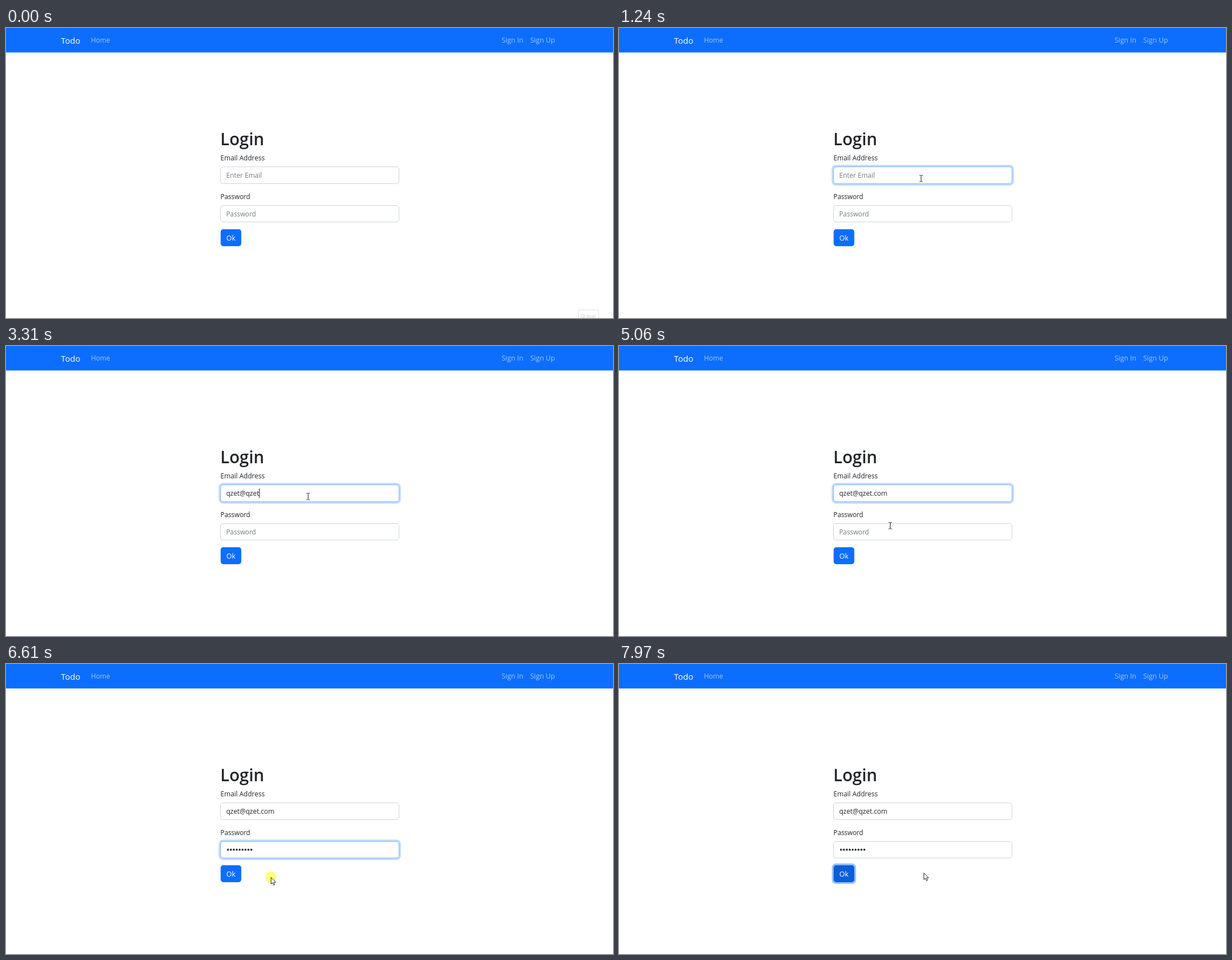
Animation, 1082 px wide and 517 px high, one loop 8 s. Source, as an HTML page:

```html
<!DOCTYPE html>
<html lang="en">
<head>
<meta charset="utf-8">
<title>Login form</title>
<style>
  html, body { margin: 0; width: 100%; height: 100%; overflow: hidden; background: #fff; }
  svg { display: block; width: 1082px; height: 517px; }
  text { font: 12px "Open Sans", "Noto Sans", sans-serif; fill: #212529; white-space: pre; }
  .nav { font-size: 12.4px; fill: #fff; fill-opacity: .6; }
  .brand { font-size: 15px; fill: #fff; }
  .title { font-size: 29.8px; font-weight: 600; }
  .hint { fill: #757b81; }
  .ok { font-size: 12.5px; fill: #fff; }
  .tip text { font-size: 9px; fill: #c9c9c9; }
  .tip rect { fill: #fff; stroke: #e2e2e2; }
  .field { fill: #fff; stroke: #ced4da; }
  .glow { fill: none; stroke: #c2dbfe; stroke-width: 3.2; }
  .edge { fill: none; stroke: #86b7fe; }
  .dots { stroke: #212529; stroke-width: 3.7; stroke-linecap: round; stroke-dasharray: 0 5.2; }
  .caret { fill: #212529; }
  .ink { fill: #fff; stroke: #111; stroke-width: .9; stroke-linejoin: round; }

  .run { animation: 8s linear infinite; }
  .tip { animation-name: tip; animation-timing-function: step-end; }
  .email-ring { animation-name: email-ring; animation-timing-function: ease-in-out; }
  .pass-ring { animation-name: pass-ring; animation-timing-function: ease-in-out; }
  .ok-ring { animation-name: ok-ring; animation-timing-function: ease-in-out; }
  .button { animation-name: button; }
  .pointer { animation-name: move; animation-timing-function: ease-in-out; }
  .click { fill: #ff0; fill-opacity: .5; animation-name: click; animation-timing-function: step-end; }
  .arrow { animation-name: arrow; animation-timing-function: step-end; }
  .beam { animation-name: beam; animation-timing-function: step-end; }
  .hand { animation-name: hand; animation-timing-function: step-end; }

  @keyframes tip { 0% { opacity: 1 } .375%, 100% { opacity: 0 } }
  @keyframes email-ring {
    0%, 8.6% { opacity: 0 } 10.5%, 64.5% { opacity: 1 } 66.4%, 100% { opacity: 0 }
  }
  @keyframes pass-ring {
    0%, 64.5% { opacity: 0 } 66.4%, 82.9% { opacity: 1 } 84.8%, 100% { opacity: 0 }
  }
  @keyframes ok-ring { 0%, 93.9% { opacity: 0 } 95.8%, 100% { opacity: 1 } }
  @keyframes button {
    0%, 86.6% { fill: #0d6efd } 88.1%, 93.9% { fill: #0b5ed7 }
    94.8% { fill: #0a58ca } 96.5%, 100% { fill: #0b5ed7 }
  }
  @keyframes move {
    0%, .375% { transform: translate(1041px, 503px); animation-timing-function: cubic-bezier(.25, .5, .4, 1) }
    6.6%, 60.25% { transform: translate(538px, 268px) }
    63.2%, 64.5% { transform: translate(483px, 320px) }
    65%, 78.5% { transform: translate(483px, 321px) }
    82.1%, 84% { transform: translate(472px, 380px) }
    87.5%, 95.5% { transform: translate(405px, 374px) }
    99.6%, 100% { transform: translate(543px, 372px) }
  }
  @keyframes click {
    0% { opacity: 0 }
    8.6% { opacity: 1 } 10.2% { opacity: 0 }
    64.5% { opacity: 1 } 66.2% { opacity: 0 }
    82.5% { opacity: 1 } 83.8% { opacity: 0 }
    93.9% { opacity: 1 } 95.4%, 100% { opacity: 0 }
  }
  @keyframes arrow {
    0% { opacity: 0 } .375% { opacity: 1 } 5% { opacity: 0 }
    61% { opacity: 1 } 62.6% { opacity: 0 }
    80% { opacity: 1 } 86.6% { opacity: 0 } 96.4%, 100% { opacity: 1 }
  }
  @keyframes beam {
    0% { opacity: 0 } 5% { opacity: 1 } 61% { opacity: 0 }
    62.6% { opacity: 1 } 80%, 100% { opacity: 0 }
  }
  @keyframes hand { 0% { opacity: 0 } 86.6% { opacity: 1 } 96.4%, 100% { opacity: 0 } }
</style>
</head>
<body>
<svg viewBox="0 0 1082 517">
  <rect width="1082" height="43.6" fill="#0d6efd"/>
  <text class="brand" x="98" y="27.5">Todo</text>
  <text class="nav" x="151.5" y="26" style="font-size:12px">Home</text>
  <text class="nav" x="883.5" y="26">Sign In</text>
  <text class="nav" x="934.5" y="26">Sign Up</text>

  <text class="title" x="382" y="209">Login</text>

  <text x="382.3" y="236">Email Address</text>
  <rect class="field" x="382.5" y="247.5" width="318" height="30" rx="4.5"/>
  <g class="run email-ring">
    <rect class="glow" x="380.6" y="245.6" width="321.8" height="33.8" rx="6.4"/>
    <rect class="edge" x="382.5" y="247.5" width="318" height="30" rx="4.5"/>
  </g>
  <text class="hint" id="emailHint" x="392.5" y="267">Enter Email</text>
  <text id="email" x="392.5" y="267"></text>

  <text x="382.3" y="304.5" style="font-size:11.8px">Password</text>
  <rect class="field" x="382.5" y="316.5" width="318" height="29.4" rx="4.5"/>
  <g class="run pass-ring">
    <rect class="glow" x="380.6" y="314.6" width="321.8" height="33.2" rx="6.4"/>
    <rect class="edge" x="382.5" y="316.5" width="318" height="29.4" rx="4.5"/>
  </g>
  <text class="hint" id="passHint" x="392.5" y="335.5" style="font-size:11.8px">Password</text>
  <path class="dots" id="dots"/>
  <rect class="caret" id="caret" width="1" height="17"/>

  <rect class="run ok-ring" x="379.5" y="355.6" width="43" height="36.4" rx="7" fill="#98c1fe"/>
  <rect class="run button" x="382.6" y="358.7" width="36.8" height="30.2" rx="4.7"/>
  <text class="ok" x="392.7" y="378.5">Ok</text>

  <g class="run tip">
    <rect x="1020.5" y="502.5" width="36" height="20"/>
    <text x="1024" y="517">Gravar</text>
  </g>

  <g class="run pointer">
    <circle class="run click" r="10"/>
    <path class="run arrow ink" d="M.5 .5V12.4L3.2 9.9L5.1 14.3L7.1 13.4L5.2 9.2H8.9Z"/>
    <path class="run beam" d="M-2.5 -5.5H-.6L.5 -5L1.6 -5.5H3.5M.5 -5V5.5M-2.5 6H-.6L.5 5.5L1.6 6H3.5" fill="none" stroke="#222"/>
    <path class="run hand ink" d="M-1 1Q0 -.6 1 1V5Q2.6 4 3.3 5.5Q5 4.6 5.6 6Q7.3 5.4 7.5 7V10.5L6 14H-.5L-4.3 8.6Q-4 6.6 -1 9Z"/>
  </g>
</svg>
<script>
  const LOOP = 8000, BLINK = 530, LEFT = 392.5, PITCH = 5.2;
  const address = "qzet@qzet.com";
  const emailKeys = [1630, 1700, 1770, 1840, 2720, 3120, 3180, 3250, 3310, 3840, 4120, 4200, 4280];
  const passKeys = [5670, 5730, 5780, 5840, 6000, 6050, 6090, 6230, 6290];
  const emailFocus = 690, passFocus = 5160, blur = 6600;

  const el = id => document.getElementById(id);
  const email = el("email"), dots = el("dots"), caret = el("caret");
  const countTyped = (keys, t) => keys.filter(k => k <= t).length;
  const show = (node, on) => node.setAttribute("visibility", on ? "visible" : "hidden");

  function render(t) {
    const chars = countTyped(emailKeys, t);
    const bullets = countTyped(passKeys, t);
    email.textContent = address.slice(0, chars);
    show(el("emailHint"), !chars);
    show(el("passHint"), !bullets);
    show(dots, bullets);
    dots.setAttribute("d", `M395.7 331h${Math.max(0, bullets - 1) * PITCH + .1}`);

    // The caret turns solid again after each focus or key.
    const inPass = t >= passFocus;
    const last = inPass
      ? (bullets ? passKeys[bullets - 1] : passFocus)
      : (chars ? emailKeys[chars - 1] : emailFocus);
    const lit = t >= emailFocus && t < blur && (t - last) % (2 * BLINK) < BLINK;
    const width = inPass ? bullets * PITCH : chars ? email.getComputedTextLength() : 0;
    caret.setAttribute("x", Math.round(LEFT + width));
    caret.setAttribute("y", inPass ? 322 : 254);
    show(caret, lit);
  }

  let start;
  function frame(now) {
    start ??= now;
    render((now - start) % LOOP);
    requestAnimationFrame(frame);
  }
  render(0);
  requestAnimationFrame(frame);
</script>
</body>
</html>
```
